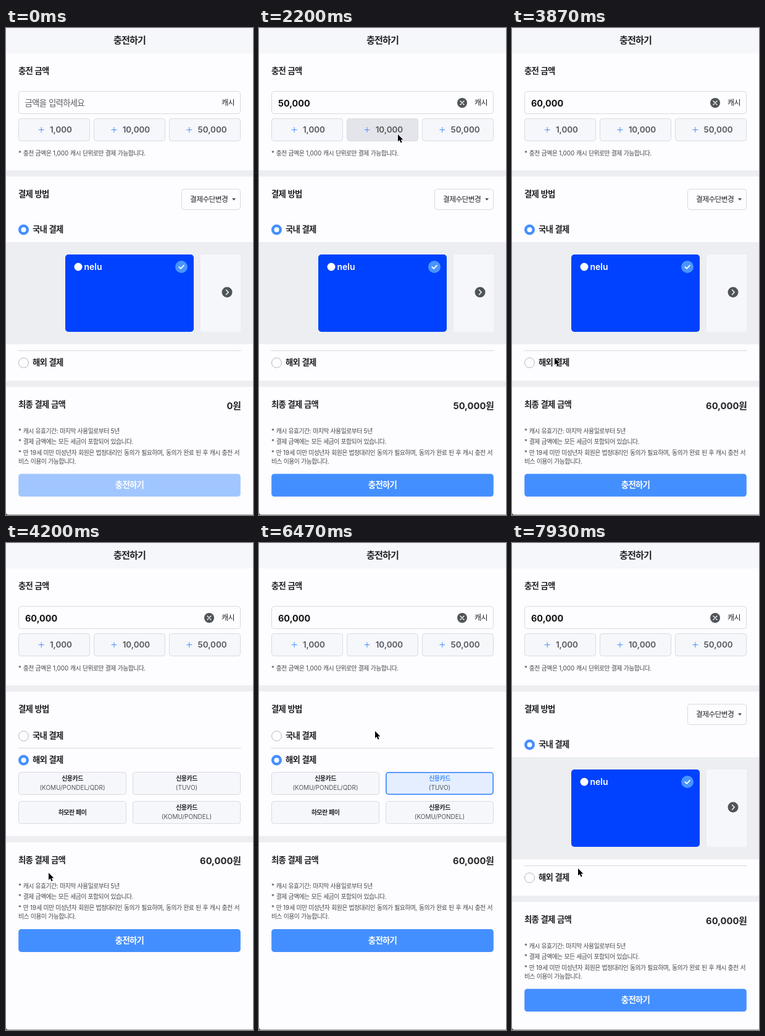
Write an HTML page that moves like this. It is 400 by 787 pixels and loops after 8 s.

```html
<!DOCTYPE html>
<html lang="ko">
<head>
<meta charset="utf-8">
<title>충전하기</title>
<style>
html, body { margin: 0; width: 100%; height: 100%; overflow: hidden; background: #fdfcff; }
svg { display: block; width: 100%; height: 100%; }
text { font-family: Inter, "Noto Sans CJK KR", "Noto Sans CJK", sans-serif; }
</style>
</head>
<body>
<svg id="stage" viewBox="0 0 400 787"></svg>
<script>
const BLUE = '#448fff', PAGE = '#fdfcff', BAND = '#eceef1', PALE = '#f5f7fb', EDGE = '#d8dbe0',
  INK = '#212327', GREY = '#53565c';
const HOVER = '#e4e5ea', PRESSED = '#d6d7dc', CHOSEN = '#e4eeff';
const LOOP = 8000;

// Text is placed by its vertical centre; Hangul is set a little tighter than Latin.
function text(x, y, str, size, { w = 400, c = INK, a = 'start', id = '' } = {}) {
  return `<text ${id && `id="${id}"`} x="${x}" y="${y + size * 0.36}" font-size="${size}" font-weight="${w}" fill="${c}" text-anchor="${a}">${runs(str)}</text>`;
}
function runs(str) {
  return str.replace(/[가-힣]+/g, s => `<tspan letter-spacing="-.056em">${s}</tspan>`);
}
function rect(x, y, w, h, fill, more = '') {
  return `<rect x="${x}" y="${y}" width="${w}" height="${h}" fill="${fill}" ${more}/>`;
}
function box(x, y, w, h, fill, id = '') {
  return rect(x + 0.5, y + 0.5, w - 1, h - 1, fill, `rx="4" stroke="${EDGE}" ${id && `id="${id}"`}`);
}
function circle(x, y, r, fill, more = '') {
  return `<circle cx="${x}" cy="${y}" r="${r}" fill="${fill}" ${more}/>`;
}
function line(d, color, width = 1) {
  return `<path d="${d}" fill="none" stroke="${color}" stroke-width="${width}" stroke-linecap="round" stroke-linejoin="round"/>`;
}
function radio(y, label, on) {
  const dot = on ? circle(28.5, y, 8.5, BLUE) + circle(28.5, y, 4, '#fff')
                 : circle(28.5, y, 8, PAGE, 'stroke="#b4b7bc"');
  return dot + text(43, y - 0.7, label, 13.4, { w: 600 });
}

const targets = [
  { id: 'add1', x: 20, y: 146, w: 116, h: 37, label: '1,000' },
  { id: 'add2', x: 142, y: 146, w: 116, h: 37, label: '10,000' },
  { id: 'add3', x: 264, y: 146, w: 116, h: 37, label: '50,000' },
  { id: 'card1', x: 20, y: 370, w: 175, h: 37, label: '신용카드', sub: '(KOMU/PONDEL/QDR)' },
  { id: 'card2', x: 205, y: 370, w: 175, h: 37, label: '신용카드', sub: '(TUVO)' },
  { id: 'card3', x: 20, y: 417, w: 175, h: 37, label: '하모란 페이' },
  { id: 'card4', x: 205, y: 417, w: 175, h: 37, label: '신용카드', sub: '(KOMU/PONDEL)' }
];
const adds = targets.slice(0, 3), cards = targets.slice(3);

function addButton({ id, x, y, w, h, label }, i) {
  const px = [57.2, 175, 296.8][i];
  return box(x, y, w, h, PALE, id) + line(`M${px - 4} 164.5h8m-4-4v8`, BLUE) +
    text(px + 13.7, 164, label, 13.4, { w: 600, c: GREY });
}
function cardButton({ id, x, y, w, h, label, sub }) {
  const cx = x + w / 2, mid = y + 18;
  return box(x, y, w, h, PALE, id) +
    text(cx, sub ? mid - 7.5 : mid, label, 10, { w: 600, a: 'middle', id: id + 'Name' }) +
    (sub ? text(cx, mid + 7.5, sub, 10, { c: GREY, a: 'middle' }) : '');
}

const header = rect(0, 0, 400, 41, '#f5f7fa') +
  text(200, 19.7, '충전하기', 15.1, { w: 600, a: 'middle' }) +
  text(20, 69, '충전 금액', 13.4, { w: 600 }) +
  box(20, 102, 360, 37, PAGE) +
  text(30.5, 121.5, '금액을 입력하세요', 13.4, { c: '#5b5e64', id: 'hint' }) +
  text(31, 121.5, '', 14.4, { w: 700, c: '#111', id: 'amount' }) +
  `<g id="clear">${circle(329, 121, 8, '#4f5459')}${line('M326 118l6 6m0-6l-6 6', '#fff', 1.3)}</g>` +
  text(369.8, 121, '캐시', 12, { w: 500, a: 'end' }) +
  adds.map(addButton).join('') +
  text(20, 202, '* 충전 금액은 1,000 캐시 단위로만 결제 가능합니다.', 9.9, { c: '#44474c' }) +
  rect(0, 230, 400, 10, BAND) +
  text(20, 268, '결제 방법', 13.4, { w: 600 });

const domestic = box(284, 260, 96, 34, PAGE) +
  text(298, 277, '결제수단변경', 11.8, { w: 500 }) +
  '<path d="M366 275.3h6l-3 3.4z" fill="#44474c"/>' +
  radio(326, '국내 결제', true) +
  rect(0, 346, 400, 165, BAND) +
  rect(96, 366, 208, 125, '#0042ff', 'rx="5"') +
  circle(117, 386, 6.5, '#fff') +
  text(126.5, 386, 'nelu', 14, { w: 600, c: '#fff' }) +
  circle(284, 386, 10, '#4a94ff') + line('M280.3 386.2l2.7 2.7 5-5.2', '#fff', 1.8) +
  `<path d="M380 366H319q-5 0-5 5V486q0 5 5 5H380z" fill="${PALE}"/>` +
  line('M314 371V486', '#e1e4e8') +
  circle(358, 427, 8.5, '#4f5459') + line('M356.5 423.2l3.7 3.8-3.7 3.8', '#fff', 1.5) +
  line('M20 521.5H380', '#d8d9dc') +
  radio(541, '해외 결제', false);

const overseas = radio(312, '국내 결제', false) +
  line('M20 331.5H380', '#d8d9dc') +
  radio(351, '해외 결제', true) +
  cards.map(cardButton).join('');

const notes = [
  [651, '* 캐시 유효기간: 마지막 사용일로부터 5년'],
  [668, '* 결제 금액에는 모든 세금이 포함되어 있습니다.'],
  [686, '* 만 19세 미만 미성년자 회원은 법정대리인 동의가 필요하며, 동의가 완료 된 후 캐시 충전 서'],
  [700, '비스 이용이 가능합니다.']
];
const summary = rect(0, 570, 400, 10, BAND) +
  text(20, 608.2, '최종 결제 금액', 13.4, { w: 600 }) +
  text(380, 610.5, '', 14.7, { w: 700, a: 'end', id: 'total' }) +
  notes.map(([y, s]) => text(20, y, s, 9.87, { c: '#44474c' })).join('') +
  rect(20.2, 720.4, 359.6, 36.8, BLUE, 'rx="4.5" id="submit"') +
  text(200, 738.5, '충전하기', 13.4, { w: 600, c: '#fff', a: 'middle' });

const stage = document.getElementById('stage');
stage.innerHTML = rect(0, 0, 400, 787, PAGE) + header +
  `<g id="domestic">${domestic}</g><g id="overseas">${overseas}</g><g id="summary">${summary}</g>` +
  rect(0, 786, 400, 1, '#a3a3a6') + '<path d="M0 782q0 5 4 5H0z" fill="#333"/>' +
  '<path id="cursor" d="M0 0V11.6l2.7-2.5 1.9 4.5 2-.9-1.9-4.3h3.7z" fill="#000" stroke="#fff" stroke-width=".9" paint-order="stroke"/>';
const $ = id => document.getElementById(id);

// Pointer stops: time, x, y
const path = [
  [600, 316, 250], [1100, 292, 153], [1480, 292, 153], [2150, 225, 172], [3250, 225, 172],
  [3800, 69, 533], [4670, 69, 533], [4930, 112, 430], [5170, 112, 430], [5390, 316, 380],
  [5900, 316, 380], [6450, 188, 304], [6560, 188, 304], [6690, 84, 306], [6880, 84, 306],
  [7620, 107, 526], [LOOP, 107, 526]
];
const presses = [[1200, 1360], [2330, 2450], [5090, 5160], [5700, 5790]];
const amounts = [[0, '0'], [1360, '50,000'], [2450, '60,000']];
const choices = [[0, ''], [5160, 'card3'], [5790, 'card2']];
const OPEN = 3930, CLOSE = 6750, LIFT = -96.3;

const latest = (steps, t) => steps.filter(s => s[0] <= t).pop()[1];
const ease = k => k * k * (3 - 2 * k);

function pointer(t) {
  const i = path.findIndex(p => p[0] > t);
  if (i < 1) return null;
  const [t0, x0, y0] = path[i - 1], [t1, x1, y1] = path[i];
  const k = ease((t - t0) / (t1 - t0));
  return { x: x0 + (x1 - x0) * k, y: y0 + (y1 - y0) * k };
}
function setText(id, str) {
  const el = $(id);
  if (el.textContent !== str) el.innerHTML = runs(str);
}
function set(el, attrs) {
  for (const key in attrs) el.setAttribute(key, attrs[key]);
}
function show(id, on) {
  set($(id), { visibility: on ? 'visible' : 'hidden' });
}

function render(t) {
  const abroad = t >= OPEN && t < CLOSE;
  const amount = latest(amounts, t), filled = amount !== '0';
  const chosen = latest(choices, t);
  const p = pointer(t);
  const down = presses.some(([a, b]) => t >= a && t < b);

  show('domestic', !abroad);
  $('overseas').style.display = abroad ? '' : 'none';
  set($('summary'), { transform: `translate(0 ${abroad ? LIFT : 0})` });
  show('hint', !filled);
  show('clear', filled);
  setText('amount', filled ? amount : '');
  setText('total', amount + '원');
  set($('submit'), { fill: filled ? BLUE : '#a1c6ff' });

  for (const { id, x, y, w, h } of targets) {
    const over = p && p.x >= x && p.x <= x + w && p.y >= y && p.y <= y + h;
    const on = id === chosen, border = on ? 1.8 : 1, name = $(id + 'Name');
    // The border grows inwards.
    set($(id), {
      x: x + border / 2, y: y + border / 2, width: w - border, height: h - border,
      fill: on ? CHOSEN : over ? (down ? PRESSED : HOVER) : PALE,
      stroke: on ? BLUE : EDGE, 'stroke-width': border
    });
    if (name) set(name, { fill: on ? BLUE : INK });
  }

  show('cursor', !!p);
  if (p) set($('cursor'), { transform: `translate(${p.x} ${p.y})` });
}

const start = performance.now();
function tick() {
  render((performance.now() - start) % LOOP);
  requestAnimationFrame(tick);
}
tick();
</script>
</body>
</html>
```
